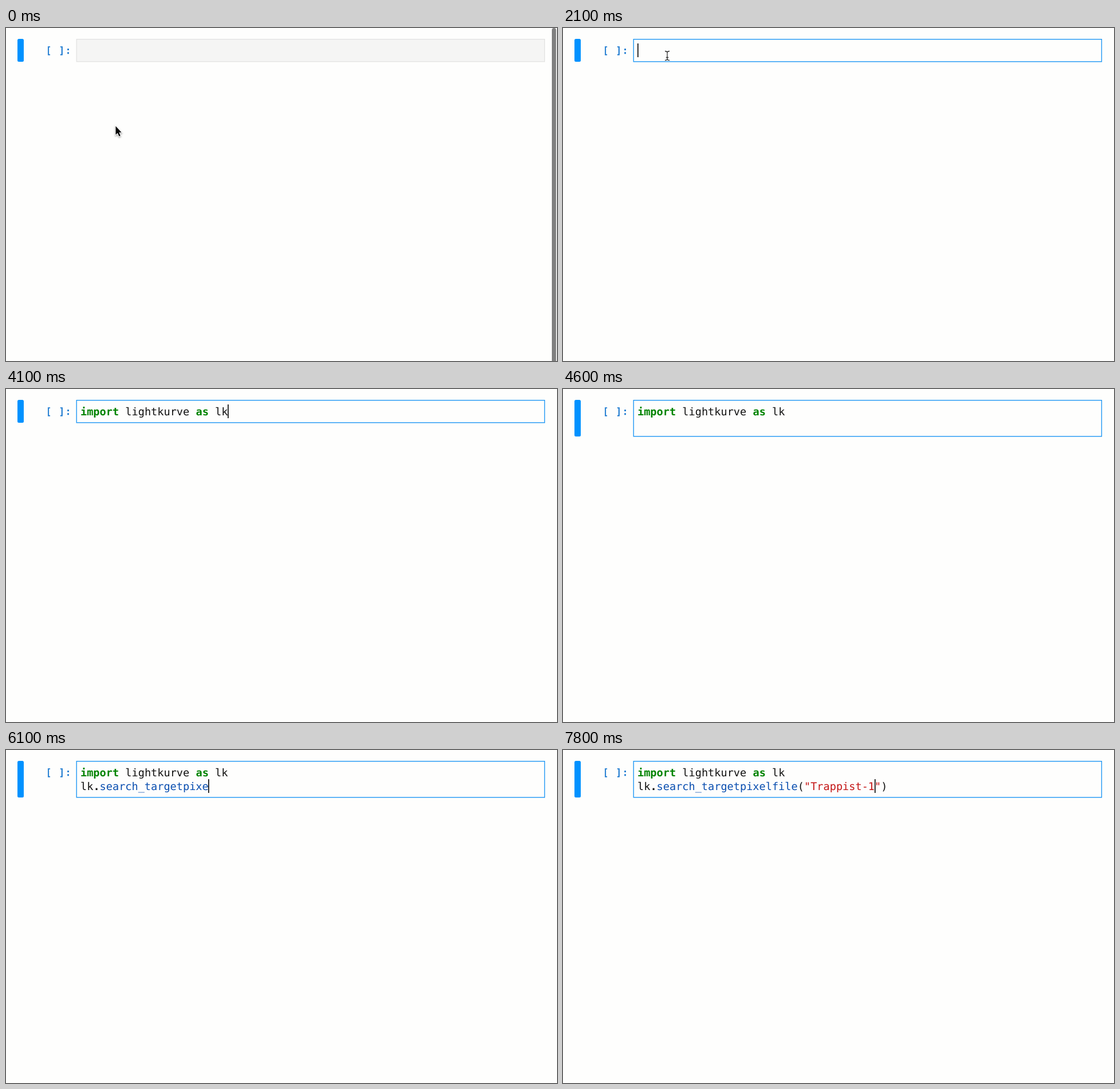
Write an HTML page with a canvas that moves like this. It is 962 px wide and 582 px high and loops after 8 s.

```html
<!DOCTYPE html>
<html lang="en">
<head>
<meta charset="utf-8">
<title>Notebook cell typing</title>
<style>
  html, body { margin: 0; width: 100%; height: 100%; overflow: hidden; background: #fefefd; }
  canvas { display: block; }
</style>
</head>
<body>
<canvas id="stage" width="962" height="582"></canvas>
<script>
const ctx = document.getElementById('stage').getContext('2d');
const LOOP = 8000, STEP = 100;
const SIZE = 18.59, ADVANCE = SIZE * 0.602, LEFT = 130, LINE = 24;
const MONO = '"DejaVu Sans Mono", monospace';
const PAGE = '#fefefd', BLUE = '#0092ff', INK = '#111';
const KEYWORD = '#008300', PROPERTY = '#0a4fb0', STRING = '#c41717', MATCH = '#12c012';

const IMPORT = 'import lightkurve as lk';
const CALL = 'lk.search_targetpixelfile()';
const TARGET = 'Trappist-1';

// Typing bursts: start time, number of steps, characters before and after
const IMPORT_BURSTS = [[2400, 9, 0, 13], [3300, 6, 13, 21], [4000, 2, 21, 23]];
const CALL_BURSTS = [[4800, 1, 0, 2], [5000, 6, 2, 10], [5600, 3, 10, 15], [5900, 8, 15, 27]];
const TARGET_BURSTS = [[7200, 7, 0, 10]];

function typed(bursts, t) {
  let count = 0;
  for (const [start, steps, from, to] of bursts) {
    if (t < start) break;
    const done = Math.min(steps, Math.floor((t - start) / STEP) + 1);
    count = from + Math.round((to - from) * done / steps);
  }
  return count;
}

function roundRect(x, y, w, h, r, color) {
  ctx.fillStyle = color;
  ctx.beginPath();
  ctx.roundRect(x, y, w, h, r);
  ctx.fill();
}

function write(text, col, row, color, bold) {
  ctx.font = `${bold ? 'bold ' : ''}${SIZE}px ${MONO}`;
  ctx.fillStyle = color;
  ctx.fillText(text, LEFT + col * ADVANCE, 46 + row * LINE);
}

function caret(col, row) {
  ctx.fillStyle = '#000';
  ctx.fillRect(Math.round(LEFT + col * ADVANCE - 0.4), 27 + row * LINE, 1.6, 24);
}

function drawCell(focused, height) {
  roundRect(20, 19, 11, height, 2.5, BLUE);
  ctx.fillStyle = focused ? PAGE : '#f5f5f4';
  ctx.fillRect(123, 19, 818, height);
  ctx.strokeStyle = focused ? '#1f97f4' : '#e0e0df';
  ctx.lineWidth = focused ? 1.4 : 1.2;
  ctx.strokeRect(123.2, 19.7, 817.2, height - 0.9);
}

function drawPrompt() {
  ctx.font = `${SIZE * 0.9}px ${MONO}`;
  ctx.fillStyle = ctx.strokeStyle = '#1676cf';
  ctx.lineWidth = 0.6;
  ['[', '', ']', ':'].forEach((ch, i) => {
    const x = 69.4 + i * 11.4;
    ctx.fillText(ch, x, 45);
    ctx.strokeText(ch, x, 45);
  });
}

function drawImport(count) {
  const text = IMPORT.slice(0, count);
  for (const [from, to, keyword] of [[0, 6, true], [7, 18], [18, 20, true], [21, 23]]) {
    const bold = keyword && count >= to;
    write(text.slice(from, to), from, 0, bold ? KEYWORD : INK, bold);
  }
}

function drawCall(t) {
  const count = typed(CALL_BURSTS, t);
  const quoted = t >= 7000;
  const inner = quoted ? `"${TARGET.slice(0, typed(TARGET_BURSTS, t))}"` : '';
  const paren = t < 7100 ? MATCH : INK;
  const text = CALL.slice(0, count);
  write(text.slice(0, 2), 0, 1, INK);
  write(text.slice(2, 3), 2, 1, INK, true);
  write(text.slice(3, 25), 3, 1, PROPERTY);
  write(text.slice(25, 26), 25, 1, paren);
  write(inner, 26, 1, STRING);
  write(text.slice(26), 26 + inner.length, 1, paren);

  let col = count;
  if (t >= 7100) col = 25 + inner.length;
  else if (quoted) col = 28;
  else if (t >= 6800) col = 26;
  if (t < 4600 || t >= 4800) caret(col, 1);
}

function drawArrow(x, y) {
  const points = [[0, 0], [0, 15], [3.4, 11.9], [5.9, 17.8], [8.3, 16.8], [5.8, 11], [10.2, 11]];
  ctx.save();
  ctx.translate(x, y);
  ctx.beginPath();
  points.forEach(([px, py]) => ctx.lineTo(px, py));
  ctx.closePath();
  ctx.shadowColor = 'rgba(0,0,0,.4)';
  ctx.shadowBlur = 3;
  ctx.shadowOffsetY = 1.5;
  ctx.strokeStyle = '#fff';
  ctx.lineWidth = 2;
  ctx.stroke();
  ctx.shadowColor = 'transparent';
  ctx.fillStyle = '#050505';
  ctx.fill();
  ctx.restore();
}

function drawBeam(x, y) {
  ctx.save();
  ctx.translate(x, y);
  ctx.beginPath();
  for (const side of [-1, 1]) {
    ctx.moveTo(side * 4, -8);
    ctx.quadraticCurveTo(side * 0.5, -8, 0, -6);
    ctx.moveTo(side * 4, 8);
    ctx.quadraticCurveTo(side * 0.5, 8, 0, 6);
  }
  ctx.moveTo(0, -6);
  ctx.lineTo(0, 6);
  ctx.moveTo(-2.2, 3);
  ctx.lineTo(2.2, 3);
  ctx.strokeStyle = '#333';
  ctx.lineWidth = 1.3;
  ctx.stroke();
  ctx.restore();
}

function drawPointer(t) {
  const ease = (start, steps) => {
    const p = Math.max(0, Math.min(1, (Math.floor((t - start) / STEP) + 1) / steps));
    return p * (2 - p);
  };
  if (t >= 2400) return;
  if (t >= 2000) return drawBeam(182, 48.5);
  const drift = ease(100, 3), rise = ease(1800, 3);
  drawArrow(191.5 - 27.3 * drift + 18 * rise, 171.5 - 41.5 * drift - 82 * rise);
}

function draw(t) {
  ctx.fillStyle = PAGE;
  ctx.fillRect(0, 0, 962, 582);
  const focused = t >= 2100, twoLines = t >= 4300;
  drawCell(focused, twoLines ? 64 : 40);
  drawPrompt();

  const count = typed(IMPORT_BURSTS, t);
  drawImport(count);
  if (twoLines) drawCall(t);
  else if (focused) caret(count, 0);

  if (t < 600) roundRect(953, 0, 7.5, 586, 4, '#808080');
  else if (twoLines && t < 4600) roundRect(953, 0, 7.5, 566, 4, '#808080');
  drawPointer(t);
}

ctx.textRendering = 'geometricPrecision';
const origin = performance.now();
function tick() {
  draw((performance.now() - origin) % LOOP);
  requestAnimationFrame(tick);
}
tick();
</script>
</body>
</html>
```
